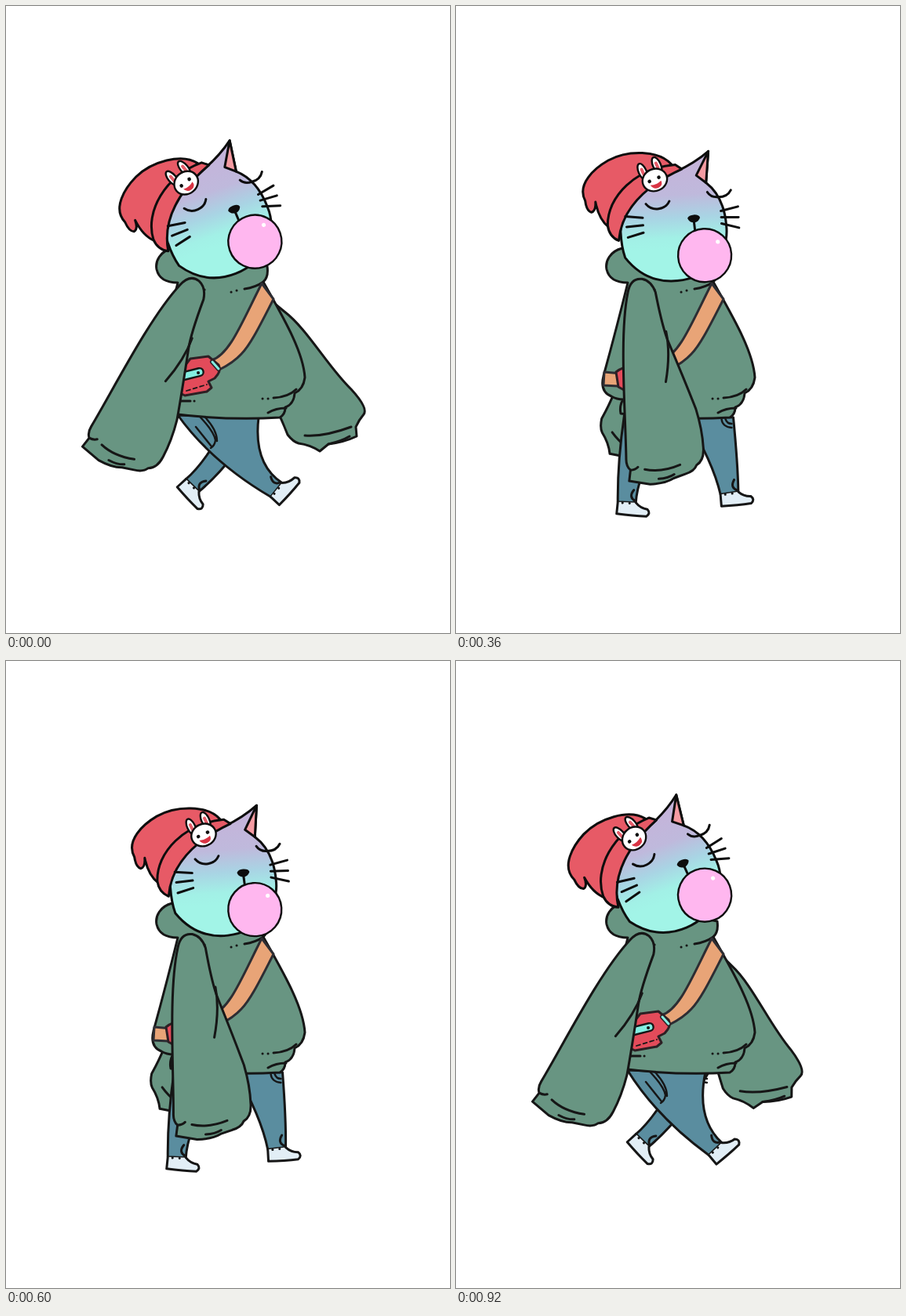
These frames come from a looping animation (566 px wide and 800 px high, 960 ms). An HTML page:

```html
<!DOCTYPE html>
<html lang="en">
<head>
<meta charset="utf-8">
<title>Walking cat</title>
<style>
  html, body { margin: 0; width: 100%; height: 100%; overflow: hidden; background: #fff; }
  svg { display: block; width: 100%; height: 100%; }
  .line { fill: none; }
  .cloth { fill: #689582; }
  .jeans { fill: #5a8d9f; }
  .shoe { fill: #e2eef6; }
  .red { fill: #e75a66; }
  .strap { fill: #e8a477; stroke: #2d2d33; }
  .bag { fill: #e34b5a; stroke: #2d2024; }
  .ink { fill: #0d0d0d; stroke: none; }
  .white { fill: #fff; }
</style>
</head>
<body>
<svg viewBox="0 0 566 800" stroke="#161616" stroke-width="3" stroke-linecap="round" stroke-linejoin="round">
  <defs>
    <linearGradient id="fur" gradientUnits="userSpaceOnUse" x1="0" y1="205" x2="0" y2="312">
      <stop offset="0" stop-color="#c4b4da"/>
      <stop offset=".35" stop-color="#bfb9dc"/>
      <stop offset=".62" stop-color="#a9d4e4"/>
      <stop offset=".86" stop-color="#a2f0e6"/>
      <stop offset="1" stop-color="#a2f4e7"/>
    </linearGradient>
    <g id="foot">
      <path class="shoe" d="M-12 0L-13 15Q8 17 25 17Q31 13 26 8Q17 7 11 0"/>
      <path class="line" d="M8 -16Q1 -7 10 -2M-6 1h.1M3 1h.1"/>
    </g>
    <g id="ear">
      <ellipse class="white" cx="10" cy="-16" rx="5" ry="11"/>
      <path class="line" stroke="#e65d6a" stroke-width="4" d="M10 -19v7"/>
    </g>
  </defs>

  <g id="farArm">
    <path class="cloth" d="M285 375L300 345L355 390C384 412 410 460 440 489Q462 513 456 521Q450 528 446 537L447 549Q430 557 411 559L400 568Q388 560 373 558Q366 556 359 547Q345 510 325 482Z"/>
    <path class="line" d="M381 548Q405 550 440 537M411 559Q428 555 438 549"/>
  </g>

  <g id="farLeg">
    <path class="jeans"/>
    <use href="#foot"/>
    <path id="pocket" class="line" stroke-width="2.4" d="M-15 2Q-14 12 -2 13M-10 2Q-8 8 -2 8"/>
  </g>

  <g id="nearLeg">
    <path class="jeans"/>
    <path class="line" stroke-width="2.4" d="M248 525Q265 543 267 554Q266 561 261 564M254 525Q269 541 269 555M242 537L262 562"/>
    <use href="#foot"/>
  </g>

  <g id="body">
    <path class="cloth" d="M212 309C196 313 190 326 192 336C195 349 206 353 219 353Q205 410 188 472Q183 492 198 498Q205 502 213 502Q208 510 210 520Q280 529 349 525Q356 521 356 512Q367 508 368 494Q379 489 381 474C379 440 352 395 328 352Q335 346 333 332Z"/>
    <path class="line" d="M304 361Q318 359 328 352M287 365h.1M294 363h.1M245 358h.1M253 362h.1M327 501h.1M334 501h.1M341 500Q360 499 370 489M334 519Q344 513 357 513M222 504h13M240 504h.1"/>
    <path class="strap" d="M189 467L211 469L207 485L188 484Z"/>
    <path class="strap" d="M326 354L341 374C325 405 312 432 300 444Q290 455 272 464L262 452C285 445 300 405 326 354Z"/>
    <path class="bag" d="M204 467Q212 460 228 459L235 450L258 447L271 458Q274 464 270 470L266 475L258 479L262 487L256 492L228 497Q214 490 207 486Z"/>
    <path class="line" stroke="#2d2024" stroke-width="6" d="M263 454L271 463"/>
    <path class="line" stroke="#83eee1" d="M263 454L271 463"/>
    <rect x="219" y="465" width="33" height="10" rx="5" fill="#83eee1" stroke-width="2.4" transform="rotate(-14 235 470)"/>
    <path class="line" d="M245 468h.1M226 473h.1" stroke-width="4"/>
    <path class="line" d="M230 491L256 483" stroke-width="1.8" stroke-dasharray="5 4"/>
  </g>

  <g id="head" stroke="#0d0d0d">
    <path fill="url(#fur)" d="M211 286Q211 305 215 319C232 343 255 353 280 352C320 350 348 320 346 285Q345 248 323 229L328 189Q310 203 285 213Q215 215 211 286Z"/>
    <path fill="#f59ba2" d="M328 189L311 219L323 229Z"/>
    <path class="red" d="M196 279C188 272 183 261 181 246Q181 258 175 259Q169 257 168 244C158 222 182 203 200 194C225 182 265 184 280 203L262 215Q210 240 196 279Z"/>
    <path class="red" d="M208 297Q196 291 195 277C196 240 235 205 285 204L293 210C255 225 215 250 208 297Z"/>

    <g transform="translate(258 222) rotate(-21)" stroke-width="2.4">
      <use href="#ear"/>
      <use href="#ear" transform="scale(-1 1)"/>
      <ellipse class="white" rx="16" ry="14"/>
      <circle class="ink" cx="-7" cy="-1" r="2.3"/>
      <circle class="ink" cx="6" cy="-1" r="2.3"/>
      <path fill="#d93444" stroke="none" d="M-8 4Q-1 7 7 4Q7 11 0 11Q-6 11 -8 4Z"/>
    </g>

    <path class="line" d="M245 252Q251 260 261 259Q271 258 275 250M324 241Q328 248 337 248Q349 249 354 240M305 277L306 292"/>
    <path id="whiskers" class="line"/>
    <path class="ink" d="M297 273Q299 269 305 269Q312 269 313 273Q311 278 306 279Q299 279 297 273Z"/>
    <circle cx="316.5" cy="321.5" r="34" fill="#ffb7ef" stroke-width="2.4"/>
    <circle class="white" cx="334" cy="305" r="2.6" stroke="none"/>
  </g>

  <g id="nearArm">
    <path class="cloth" d="M219 364C220 350 226 345 235 345Q247 346 254 360C261 382 270 408 278 422Q304 468 322 502Q333 527 337 550Q340 566 331 573Q329 581 318 586L304 593Q294 601 275 604L248 603L248 589Q242 585 241 576C234 520 214 420 219 364Z"/>
    <path class="line" d="M273 408Q282 435 280 472M248 589Q254 588 257 584M266 586Q287 588 310 575M285 596Q297 594 304 588"/>
  </g>
</svg>

<script>
const STEP = 40, LOOP = 960, TURN = 480;
const $ = id => document.getElementById(id);

// 0 at the start, 1 at the turn, back to 0 at `end`
const swing = (t, end) => t < TURN ? t / TURN : (end - t) / (end - TURN);

// Legs as they swing from one stride to the other
const near = u => ({
  hips: [219 - 6 * u, 322 - 50 * u],
  knees: [262 - 75 * u, 315 - 110 * u],
  x: 345 - 169 * u,
  y: 617 + 62 * u * (1.1 - u),
  tilt: -51 + 88 * u - 23 * u * u
});
const far = u => ({
  hips: [287 + 6 * u, 322 + 42 * u],
  knees: [255 + 97 * u, 288 + 95 * u],
  x: 238 + 148 * u,
  y: 612 + 42 * u * (1.05 - u),
  tilt: 44 - 70 * u
});

function drawLeg(id, { hips, knees, x, y, tilt }) {
  const a = tilt * Math.PI / 180;
  const cuff = d => `${x + d * Math.cos(a)} ${y + d * Math.sin(a)}`;
  $(id).querySelector(".jeans").setAttribute("d",
    `M${hips[0]} 522Q${knees[0]} 582 ${cuff(-12)}L${cuff(11)}Q${knees[1]} 584 ${hips[1]} 525Z`);
  $(id).querySelector("use").setAttribute("transform", `translate(${x} ${y}) rotate(${tilt})`);
}

function turn(id, deg, x, y, dy = 0) {
  $(id).setAttribute("transform", `translate(0 ${dy}) rotate(${deg} ${x} ${y})`);
}

function drawWhiskers() {
  let d = "";
  for (const i of [-1, 0, 1]) {
    d += `M${219 + i} ${280 + 13.5 * i}L240 ${279 + 9.5 * i}`;
    d += `M340 ${274 + 8 * i}L362 ${275 + 13.5 * i}`;
  }
  $("whiskers").setAttribute("d", d);
}

function draw(t) {
  const slow = swing(t, LOOP), quick = swing(t, LOOP - STEP);
  const tip = t < TURN ? -19 : -20.8;
  turn("head", tip + (2.3 - tip) * quick, 254.7, 308.5);
  turn("nearArm", 38 - 42 * quick, 232, 364, 4 * Math.sin(Math.PI * quick));
  turn("farArm", 66.5 * slow, 278, 358, -120 * slow * (0.92 - slow));
  drawLeg("nearLeg", near(slow));
  const leg = far(quick);
  drawLeg("farLeg", leg);
  $("pocket").setAttribute("transform", `translate(${leg.hips[1]} 525)`);
}

drawWhiskers();
const start = performance.now();
function tick() {
  const t = (performance.now() - start) % LOOP;
  draw(Math.floor(t / STEP) * STEP);
  requestAnimationFrame(tick);
}
tick();
</script>
</body>
</html>
```
